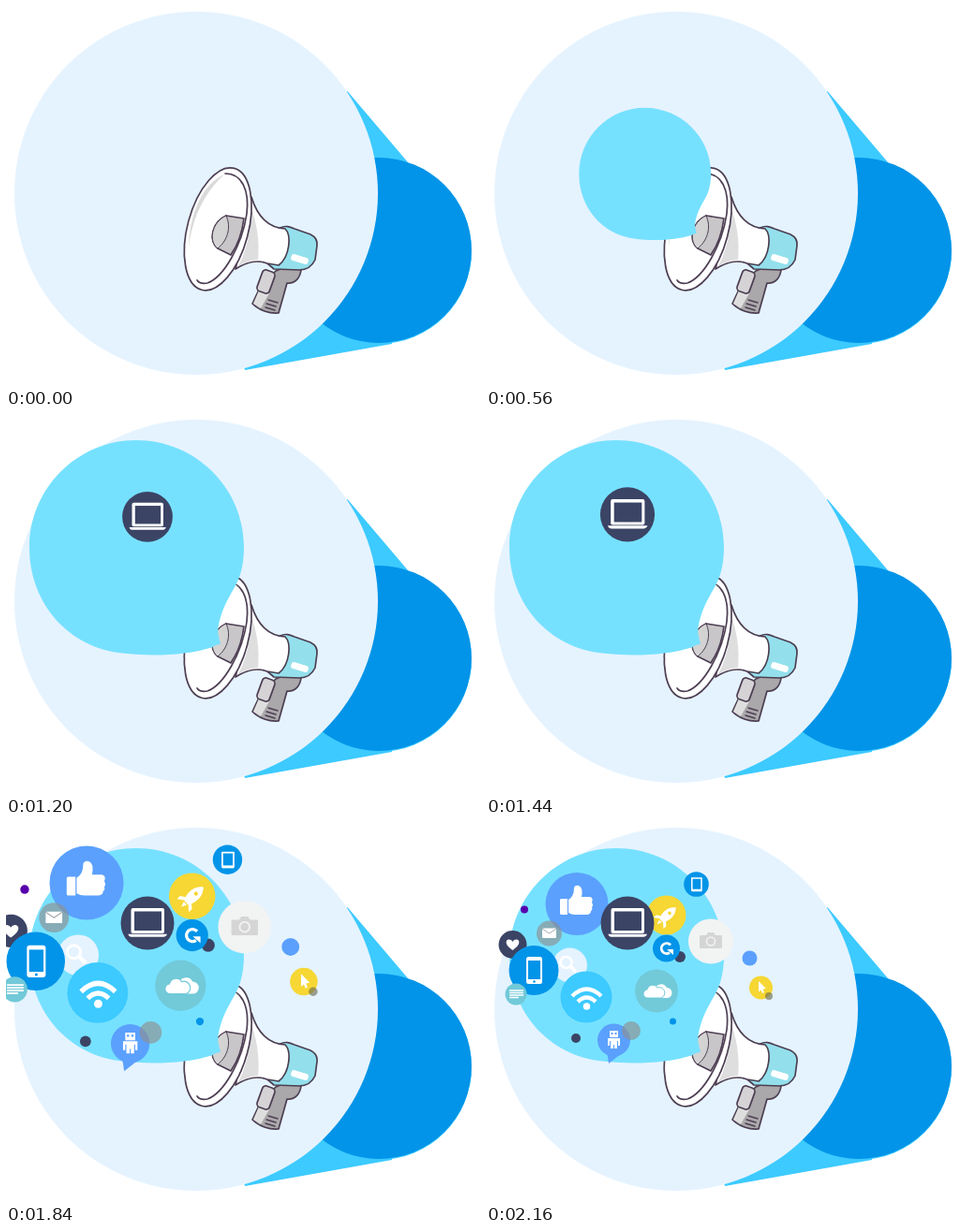
These frames come from a looping animation (506 by 406 pixels, 4.8 s). An HTML page:

```html
<!DOCTYPE html>
<html lang="en">
<head>
<meta charset="utf-8">
<title>Megaphone</title>
<style>
  html, body { margin: 0; width: 100%; height: 100%; overflow: hidden; background: #fff; }
  svg { display: block; }
  .navy { fill: #3b4465; }
  .blue { fill: #0294e8; }
  .sky { fill: #3ccaff; }
  .peri { fill: #5ba0fd; }
  .yellow { fill: #f6d733; }
  .teal { fill: #72c9d8; }
  .pale { fill: #e5f3ff; }
  .grey { fill: #8f8f8f; fill-opacity: .65; }
  .white { fill: #fff; }
  .line { fill: none; stroke: #fff; }
  .ink { stroke: #4d3f52; stroke-width: 1.7; stroke-linejoin: round; stroke-linecap: round; }
</style>
</head>
<body>
<svg width="506" height="406" viewBox="0 0 506 406">
  <path class="sky" d="M364.500 91 429 167 412 361 255 389 203 200Z"/>
  <circle class="sky" cx="398" cy="262" r="99"/>
  <circle class="blue" cx="398" cy="261" r="99"/>
  <circle class="pale" cx="203" cy="200" r="194"/>

  <g id="megaphone" class="ink" fill="none">
    <path fill="#aaa8ab" d="M288 283 301 278 315 282C314 290 309 297 300 296L291 328C281 329 270 325 263 318L270 303Z"/>
    <path fill="#dedede" stroke="none" d="M270 304 281 307 272 323 264 318Z"/>
    <path d="M280 314 290 317M278 318 288 321M277 322 287 325" stroke-width="1.4"/>
    <rect x="270.5" y="282.5" width="14" height="24" rx="4" fill="#d5d3d6" transform="rotate(20 277.5 294.5)"/>
    <path fill="#93e0ec" d="M293 237C298 234 303 236 308 238L325 244Q333 248 332 256L330 271Q325 282 313 282L286 281 279 275Z"/>
    <rect class="white" x="304" y="267" width="19" height="7" rx="3" stroke="none" transform="rotate(17 313.5 270.5)"/>
    <path class="white" d="M262 204C268 224 280 237 298 238C305 245 303 268 291 277L279 275C268 271 258 273 245 281Z"/>
    <path fill="#dedede" stroke="none" d="M262 216C268 234 271 252 269 271Q258 272 248 278Q262 250 262 216Z"/>
    <ellipse class="white" cx="226.2" cy="238.3" rx="32.5" ry="67.2" transform="rotate(15 226.2 238.3)"/>
    <path fill="#dadada" stroke="none" d="M233 180C211 189 196 220 195 258C199 226 212 199 233 180Z"/>
    <path fill="#c8c6c9" d="M235 224 254 227C252 243 247 256 240 266L226 259C216 252 219 231 235 224Z"/>
    <path fill="#d3d3d3" d="M235 224C241 237 236 251 226 259C216 252 219 231 235 224Z" stroke-width="1"/>
    <path d="M234 179C252 179 260 197 257 222C252 256 232 290 215 296C210 297 206 296 204 293"/>
  </g>

  <path id="bubble" fill="#76e1ff" d="M139 28C202.500 28 254 79.500 254 142C254 170 246 182 239 194C231 208 225 226 226.500 236L229 246Q224 246 221 249C190 259 150 259 120 255C63 247 25 199 25 143C25 79.500 76 28 139 28Z"/>

  <g id="icons">
    <circle cx="41" cy="93.500" r="4" fill="#5600ad"/>
    <circle class="peri" cx="97" cy="87.500" r="33.500"/>
    <path class="white" d="M80 82H87V99H80Q79 99 79 97V83ZM88 83Q94 80 94 70Q95 67 99 68Q104 70 102 80H111Q115 81 113 86Q115 89 113 91Q114 94 112 95Q112 99 107 99H95Q91 99 88 97Z"/>

    <circle class="grey" cx="67.500" cy="119" r="13.500"/>
    <rect class="white" x="60" y="113.500" width="15" height="10.500" rx="1"/>
    <path d="M60 114 67.500 119 75 114" fill="none" stroke="#a5aaae"/>

    <circle class="navy" cx="28.500" cy="131" r="15"/>
    <path class="white" d="M28.500 137C15 128 25 122 28.500 128C32 122 42 128 28.500 137Z"/>

    <circle class="pale" cx="89.500" cy="153" r="18.500"/>
    <circle class="line" cx="85.500" cy="150" r="6" stroke-width="2.500"/>
    <path class="line" d="M90 154 96 160" stroke-width="3.500"/>

    <circle class="blue" cx="51" cy="158.500" r="26.500"/>
    <rect class="white" x="43" y="144" width="17" height="29" rx="2.500"/>
    <path class="blue" d="M45 148H58V168H45Z"/>
    <circle class="blue" cx="51.500" cy="170.500" r="1.300"/>

    <circle class="teal" cx="32" cy="184" r="11.500"/>
    <path class="line" d="M25 180H40M25 182.500H40M25 185H40M25 187.500H35" stroke-width="1.600"/>

    <circle class="sky" cx="107" cy="187" r="27.500"/>
    <circle class="white" cx="107.500" cy="197" r="3.800"/>
    <path class="line" d="M92 186Q107.500 171 123 186M98 192Q107.500 183 117 192" stroke-width="4.500"/>

    <circle class="teal" cx="182" cy="180.500" r="23"/>
    <path class="white" d="M180 179A7 7 0 0 1 193 177A5.500 5.500 0 0 1 193 188H180Z"/>
    <path class="white" stroke="#72c9d8" d="M173 188A4.500 4.500 0 0 1 172 179A6 6 0 0 1 183 177A5 5 0 0 1 187 188Z"/>

    <circle class="navy" cx="96" cy="231" r="5"/>
    <path class="peri" d="M129 244 131 258 145 247Z"/>
    <circle class="peri" cx="136.500" cy="233" r="17.500"/>
    <path class="white" d="M132 223H141V230H132ZM130 231H143V239H141V234H140V242H137V238H136V242H133V234H132V239H130Z"/>
    <path class="peri" d="M133.500 225H135.500V227H133.500ZM137.500 225H139.500V227H137.500Z"/>
    <circle class="grey" cx="155" cy="223" r="10"/>
    <circle class="blue" cx="199.500" cy="213" r="3.500"/>

    <circle class="yellow" cx="192.500" cy="99.500" r="21"/>
    <g transform="translate(193 100) rotate(48)">
      <path class="white" d="M0 -13C6 -8 6 0 4 5L8 8V12L3 8H-3L-8 12V8L-4 5C-6 0 -6 -8 0 -13ZM-2 9H2L0 14Z"/>
      <circle class="yellow" cy="-4" r="1.800"/>
    </g>

    <circle class="navy" cx="207" cy="144" r="6"/>
    <circle class="blue" cx="192.500" cy="135" r="14.500"/>
    <path class="line" d="M197 131.500A5.500 5.500 0 1 0 196 139.500" stroke-width="2.800"/>
    <path class="white" d="M193 136H200V142Z"/>

    <circle cx="240" cy="127.500" r="24" fill="#f2f3f3"/>
    <path fill="#d5d5d5" d="M229 121H235L237 118H243L245 121H251Q252 121 252 122V134Q252 135 251 135H229Q228 135 228 134V122Q228 121 229 121Z"/>
    <circle cx="240" cy="127.500" r="4.500" fill="none" stroke="#f2f3f3" stroke-width="1.500"/>

    <circle class="blue" cx="224.500" cy="66.500" r="13.300"/>
    <path class="line" d="M219.800 60H230V73H219.800Z" stroke-width="1.500"/>
    <path class="line" d="M219.800 73H230" stroke-width="2.500"/>

    <circle class="peri" cx="281.500" cy="145.500" r="8"/>
    <circle class="yellow" cx="293.500" cy="177" r="12.500"/>
    <path class="white" d="M291 170 299 178 295.500 178.500 297 182 295 183 293.500 179.500 291 181.500Z"/>
    <circle cx="302" cy="186" r="4" fill="#6f6f50" fill-opacity=".65"/>
  </g>

  <g id="laptop">
    <circle class="navy" cx="151" cy="108" r="28.500"/>
    <rect class="white" x="133.500" y="92" width="35.500" height="27" rx="2"/>
    <path class="navy" d="M137 95.500H166V116H137Z"/>
    <path class="white" d="M130.500 119.800H172Q171 122.800 168 122.800H134Q131 122.800 130.500 119.800Z"/>
  </g>
</svg>
<script>
  const LOOP = 4800, STEP = 80;

  // Each part grows about its origin, overshoots at `peak`, then settles to full size.
  const parts = [
    { id: 'bubble', x: 218, y: 238, start: 360, peak: 720, end: 980, over: 1.055 },
    { id: 'laptop', x: 151, y: 141, start: 920, peak: 1280, end: 1520, over: 1.08 },
    { id: 'icons', x: 158, y: 212.5, start: 1530, peak: 1840, end: 2160, over: 1.18 }
  ];
  for (const part of parts) part.node = document.getElementById(part.id);

  function ease(from, to, time) {
    const k = Math.min(1, Math.max(0, (time - from) / (to - from)));
    return k * k * (3 - 2 * k);
  }

  function draw() {
    const time = Math.floor(performance.now() % LOOP / STEP) * STEP;
    for (const { node, x, y, start, peak, end, over } of parts) {
      const scale = over * ease(start, peak, time) - (over - 1) * ease(peak, end, time);
      node.setAttribute('transform', `translate(${x} ${y}) scale(${scale}) translate(${-x} ${-y})`);
    }
    requestAnimationFrame(draw);
  }
  draw();
</script>
</body>
</html>
```
